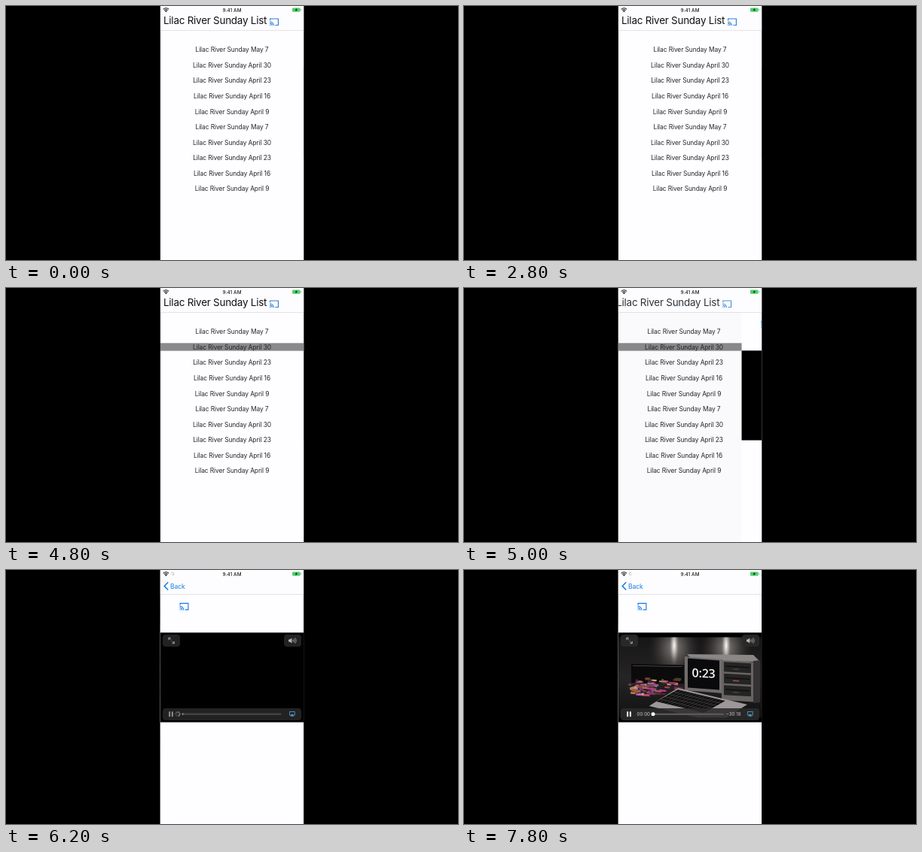
Write an HTML page with a canvas that moves like this. It is 600 by 338 pixels and loops after 8 s.

```html
<!DOCTYPE html>
<html lang="en">
<head>
<meta charset="utf-8">
<title>List and player</title>
<style>
  html, body { margin: 0; width: 100%; height: 100%; overflow: hidden; background: #000; }
  canvas { display: block; width: 600px; height: 338px; }
</style>
</head>
<body>
<canvas id="stage"></canvas>
<script>
const LOOP = 8000;
const W = 600, H = 338;
const LEFT = 204.7, PHONE = 190.6;
const NAME = 'Lilac River Sunday';
const DATES = ['May 7', 'April 30', 'April 23', 'April 16', 'April 9'];
const PAPER = '#fefdff', BLUE = '#147ce5', GREY = '#b5b5b5';
const TIME = { tap: 4600, push: 4964, controls: 5100, wait: 5750, play: 7000 };

const canvas = document.getElementById('stage');
const ratio = window.devicePixelRatio || 1;
canvas.width = W * ratio;
canvas.height = H * ratio;
const c = canvas.getContext('2d');

function box(x, y, w, h, fill) {
  c.fillStyle = fill;
  c.fillRect(x, y, w, h);
}

function pill(x, y, w, h, r, fill) {
  c.fillStyle = fill;
  c.beginPath();
  c.roundRect(x, y, w, h, r);
  c.fill();
}

function trace(points) {
  c.beginPath();
  points.forEach(([x, y]) => c.lineTo(x, y));
}

function line(color, width, ...points) {
  trace(points);
  c.strokeStyle = color;
  c.lineWidth = width;
  c.stroke();
}

function poly(fill, ...points) {
  trace(points);
  c.fillStyle = fill;
  c.fill();
}

function arc(x, y, r, from, to, color, width) {
  c.beginPath();
  c.arc(x, y, r, from, to);
  c.strokeStyle = color;
  c.lineWidth = width;
  c.stroke();
}

function disc(x, y, r, fill) {
  pill(x - r, y - r, 2 * r, 2 * r, r, fill);
}

function text(str, x, y, size, color, align = 'left', spacing = 0, weight = 400, face = 'Inter') {
  c.font = `${weight} ${size}px "${face}", "Liberation Sans", sans-serif`;
  c.letterSpacing = spacing + 'px';
  c.textAlign = align;
  c.fillStyle = color;
  c.fillText(str, x, y);
}

function layer(dx, alpha, draw) {
  c.save();
  c.translate(dx, 0);
  c.globalAlpha *= alpha;
  draw();
  c.restore();
}

function clip(x, y, w, h, draw) {
  c.save();
  c.beginPath();
  c.rect(x, y, w, h);
  c.clip();
  draw();
  c.restore();
}

// Draws a half and its copy turned by 180 degrees
function twice(x, y, draw) {
  for (const angle of [0, Math.PI]) {
    c.save();
    c.translate(x, y);
    c.rotate(angle);
    draw();
    c.restore();
  }
}

// Rectangle in oblique view, with content in its own coordinates
function panel(x, y, w, h, fill, slope, lean = 0, draw = () => {}) {
  c.save();
  c.transform(1, slope, lean, 1, x, y);
  box(0, 0, w, h, fill);
  draw();
  c.restore();
}

function random(seed) {
  return () => (seed = (seed * 16807) % 2147483647) / 2147483647;
}

// Critically damped spring, 0 to 1
function spring(ms) {
  const k = Math.max(0, ms) * 0.0177;
  return 1 - (1 + k) * Math.exp(-k);
}

function castIcon(x, y, color) {
  const right = x + 11.4, bottom = y + 9.1;
  line(color, 1.15, [x + 0.6, y + 2.9], [x + 0.6, y + 0.6], [right, y + 0.6],
    [right, bottom], [x + 7.3, bottom]);
  for (let i = 0; i < 3; i++) arc(x, y + 9.7, 1 + i * 2.2, -Math.PI / 2, 0, color, 1.1);
}

function spinner(x, y, r, t, rgb) {
  const step = Math.floor(t / 83) % 12;
  for (let i = 0; i < 12; i++) {
    const age = (step - i + 12) % 12;
    const cos = r * Math.cos(i * Math.PI / 6), sin = r * Math.sin(i * Math.PI / 6);
    line(`rgba(${rgb},${1 - age * 0.07})`, r * 0.22,
      [x + cos / 2, y + sin / 2], [x + cos, y + sin]);
  }
}

function listPage(t) {
  box(LEFT, 0, PHONE, H, PAPER);
  if (t >= TIME.tap) box(LEFT, 73.3, PHONE, 10.3, '#8a898c');
  for (let i = 0; i < 10; i++) {
    text(`${NAME} ${DATES[i % 5]}`, 300, 61.4 + i * 20.53, 8.4, '#242426', 'center', -0.08);
  }
}

function glow(x, y, rx, ry, alpha) {
  c.save();
  c.translate(x, y);
  c.scale(rx, ry);
  const g = c.createRadialGradient(0, 0, 0, 0, 0, 1);
  g.addColorStop(0, `rgba(255,250,244,${alpha})`);
  g.addColorStop(0.45, `rgba(225,218,212,${alpha * 0.5})`);
  g.addColorStop(1, 'rgba(90,86,84,0)');
  box(-1, -1, 2, 2, g);
  c.restore();
}

function packages() {
  const rnd = random(71);
  for (let i = 0; i < 75; i++) {
    const y = rnd() * 22;
    const x = rnd() * (y > 14 ? 44 : 66);
    const hue = (rnd() * 150 + 270) % 360;
    panel(218 + x, 143 + y, 3 + rnd() * 7, 1.5 + rnd() * 2,
      `hsl(${hue},${20 + rnd() * 40}%,${20 + rnd() * 45}%)`, 0.06);
  }
}

function computer() {
  panel(296, 112, 88, 9, '#8b8787', 0.01, 1);
  panel(384, 121, 9, 56, '#343233', -0.1);
  panel(293, 115, 50, 45, '#716d6d', 0.08);
  panel(297, 117.5, 42, 39, '#0a0a0c', 0.07);
  panel(342, 120, 42, 53, '#686464', 0.06, 0, () => {
    for (let i = 0; i < 3; i++) {
      const y = 2 + i * 15.5;
      box(3, y, 36, 13, '#252425');
      box(5, y + 5, 32, 1.2, '#0d0d0e');
      box(15, y + 8, 8, 1.5, i === 1 ? '#a3504b' : '#454243');
    }
  });
  panel(284, 157, 92, 24, '#9d9897', 0.24, -1.6);
  panel(284, 159, 63, 16, '#444041', 0.24, -1.8, () => {
    for (let i = 0; i < 70; i++) {
      box((i % 14) * 4.5 + 0.4, Math.floor(i / 14) * 3.2 + 0.3, 3.8, 2.7, '#101011');
    }
  });
  panel(318, 137, 0, 0, '#000', 0.05, 0, () => {
    text('0:23', 0, 6, 16, '#f7f7f5', 'center', -0.2, 600, 'Open Sans');
  });
}

function film() {
  const wall = c.createLinearGradient(0, 89, 0, 197);
  wall.addColorStop(0, '#171616');
  wall.addColorStop(0.5, '#262424');
  wall.addColorStop(1, '#111');
  box(LEFT, 89, PHONE, 108, wall);
  for (const x of [279, 348]) {
    glow(x, 103, 34, 42, 0.45);
    glow(x, 100, 7, 30, 1);
  }
  panel(222, 125, 70, 25, '#0b0b0c', 0.02);
  panel(224, 127, 66, 0.8, '#565253', 0.02);
  packages();
  computer();
}

function button(x, fill) {
  pill(x, 86, 23, 16, 4, fill);
}

function resizeButton(fill) {
  button(208, fill);
  twice(219.6, 94, () => {
    line(GREY, 0.9, [0.8, 0.8], [3.6, 3.6]);
    line(GREY, 0.9, [0.9, 3.7], [3.7, 3.7], [3.7, 0.9]);
  });
}

function soundButton(fill) {
  button(369, fill);
  box(375, 92.6, 2, 2.8, GREY);
  poly(GREY, [376.4, 92.8], [379.4, 90.5], [379.4, 97.5], [376.4, 95.2]);
  for (let i = 1; i < 4; i++) arc(379.2, 94, i * 1.9, -0.7, 0.7, GREY, 0.8);
}

function airIcon() {
  const ink = '#5299c9';
  c.strokeStyle = ink;
  c.lineWidth = 0.9;
  c.strokeRect(376.6, 188.6, 6.6, 4.4);
  poly(ink, [379.9, 191.2], [382.4, 194.8], [377.4, 194.8]);
}

function controls(t) {
  const playing = t >= TIME.play;
  const fill = playing ? 'rgba(44,43,43,0.88)' : '#222223';
  resizeButton(fill);
  soundButton(fill);
  pill(208, 184, 184, 16, 4, fill);
  for (const x of [216.2, 219.9]) box(x, 188.4, 1.9, 6.8, playing ? '#fff' : '#929292');
  if (playing) {
    text('00:00', 229.6, 194.1, 6.2, '#c4c4c4');
    pill(249, 190.7, 96, 2.2, 1.1, '#5b5959');
    disc(251, 191.8, 2.5, '#fff');
    text('−30:18', 367.5, 194.1, 6.2, '#c4c4c4', 'right');
  } else {
    pill(233.5, 190.6, 132, 2.3, 1.1, '#434344');
    pill(233.5, 190.6, 2.2, 2.3, 1.1, '#8c8c8c');
    if (t >= TIME.wait) spinner(228, 191.7, 3.6, t, '215,215,215');
  }
  airIcon();
}

function detailPage(t) {
  box(LEFT, 0, PHONE, H, PAPER);
  castIcon(230.5, 43.8, BLUE);
  box(LEFT, 83.3, PHONE, 119.3, '#000');
  if (t >= TIME.play) clip(LEFT, 89.5, PHONE, 107, film);
  if (t >= TIME.controls) controls(t);
}

function navBar(p) {
  box(LEFT, 0, PHONE, 32.5, '#fdfcfe');
  box(LEFT, 32.2, PHONE, 0.6, '#d3d2d5');
  layer(-72 * p ** 1.2, 1 - p, () => {
    text(NAME + ' List', 209, 23.6, 13.4, '#111113', 'left', -0.22);
    castIcon(350, 16.4, '#2f82d6');
  });
  layer(0, p, () => line(BLUE, 1.5, [215.2, 16.3], [210.2, 21.4], [215.2, 26.5]));
  layer(68 * (1 - p), p, () => text('Back', 218, 24.5, 8.5, BLUE, 'left', -0.1));
}

function statusBar(t) {
  for (const r of [3.1, 5.2]) arc(212.4, 8, r, -Math.PI * 0.75, -Math.PI * 0.25, '#111', 1.1);
  disc(212.4, 7, 1.1, '#111');
  if (t >= TIME.wait) spinner(221, 5, 2.4, t, '125,125,130');
  text('9:41 AM', 300, 7.6, 6.3, '#1b1b1d', 'center', 0.1, 500);
  pill(380, 2.4, 10.6, 5.4, 1.3, '#53cf70');
  pill(391.1, 4, 0.8, 2.2, 0.4, '#53cf70');
  twice(385.3, 5.1, () => poly('#153a1f', [0.9, -2.4], [-2.1, 0.3], [0.4, 0.3]));
}

function phone(t) {
  const p = spring(t - TIME.push);
  layer(-57 * p, 1, () => listPage(t));
  box(LEFT, 0, PHONE, H, `rgba(0,0,0,${0.1 * p})`);
  layer(PHONE * (1 - p), 1, () => detailPage(t));
  navBar(p);
  statusBar(t);
}

function draw(t) {
  c.setTransform(ratio, 0, 0, ratio, 0, 0);
  box(0, 0, W, H, '#000');
  clip(LEFT, 0, PHONE, H, () => phone(t));
}

const start = performance.now();
function tick() {
  draw((performance.now() - start) % LOOP);
  requestAnimationFrame(tick);
}
tick();
</script>
</body>
</html>
```
